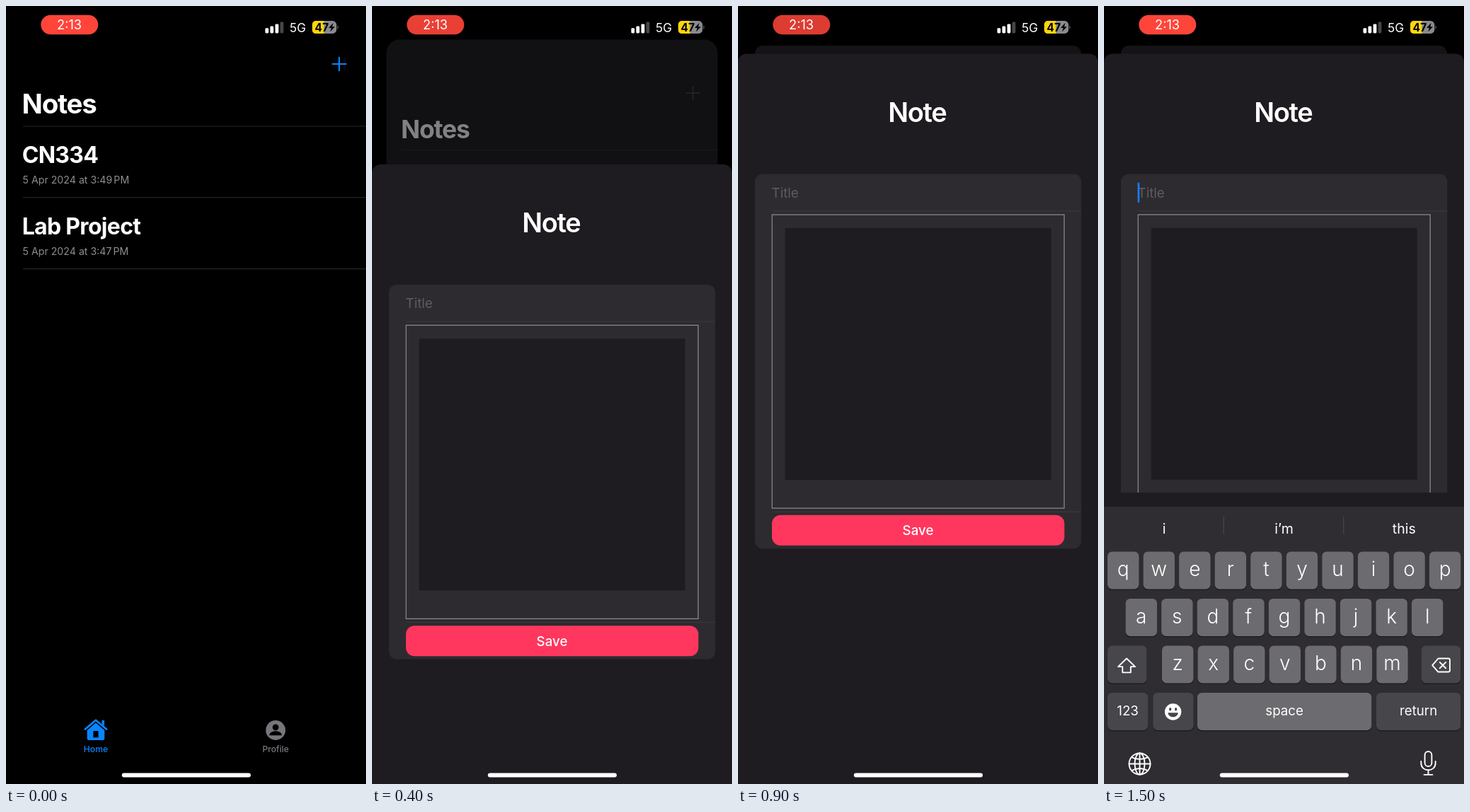
An HTML page for the animation above (1.6 s loop, 509 px wide and 1100 px high).

```html
<!DOCTYPE html>
<html lang="en">
<head>
<meta charset="utf-8">
<title>Notes app</title>
<style>
  html, body { margin: 0; width: 100%; height: 100%; overflow: hidden; background: #000; }
  svg { display: block; width: 100vw; height: 100vh; }
  text { font-family: Inter, sans-serif; font-optical-sizing: none; fill: #fff; }
  .mid { text-anchor: middle; }
  .label { font-size: 18.7px; }
  .date { font-size: 14.2px; fill: #8d8d93; }
  .item { font-size: 32px; font-weight: 700; letter-spacing: -.7px; }
  .tab { font-size: 12.2px; font-weight: 500; text-anchor: middle; }
  .key { font-size: 28px; font-weight: 300; text-anchor: middle; }
  .icon { fill: none; stroke: #fff; stroke-width: 1.9; stroke-linejoin: round; stroke-linecap: round; }
</style>
</head>
<body>
<svg viewBox="0 0 509 1100" preserveAspectRatio="none">
  <rect width="509" height="1100" fill="#000"/>

  <g id="home">
    <rect id="card" width="509" height="1100"/>
    <g id="list">
      <path id="plus" d="M460.8 82h20.6M471.1 71.7v20.6" stroke-width="2.1"/>
      <text x="22.5" y="151.5" font-size="38.5" font-weight="700" letter-spacing="-1.2">Notes</text>
      <path d="M24 170h485M24 270.6h485M24 371.6h485" stroke="#252528" stroke-width="1.2"/>
      <text class="item" x="22.7" y="222">CN334</text>
      <text class="date" x="23.5" y="251">5 Apr 2024 at 3:49<tspan dx="2">PM</tspan></text>
      <text class="item" x="22.7" y="323">Lab Project</text>
      <text class="date" x="23.5" y="352">5 Apr 2024 at 3:47<tspan dx="2">PM</tspan></text>
      <g fill="#0a84ff">
        <path d="M112 1022.5L127 1009.8l15 12.7" fill="none" stroke="#0a84ff" stroke-width="2.8" stroke-linecap="round" stroke-linejoin="round"/>
        <path d="M135.5 1010h3.6v8l-3.6-3z"/>
        <path fill-rule="evenodd" d="M127 1013.5l12.3 10.4v11.3q0 2.8-2.8 2.8h-19q-2.8 0-2.8-2.8v-11.3zM123.4 1025v9.3h7.2v-9.3z"/>
        <text class="tab" x="127" y="1055" style="fill:#0a84ff">Home</text>
      </g>
      <circle cx="381.2" cy="1024" r="13.9" fill="#77767b"/>
      <circle cx="381.2" cy="1019.8" r="4.4"/>
      <path d="M372.4 1031.2c0-8 17.6-8 17.6 0z"/>
      <text class="tab" x="381.2" y="1055" style="fill:#77767b">Profile</text>
    </g>
  </g>

  <g id="sheet">
    <path id="panel" fill="#1e1c20"/>
    <text class="mid" x="253.4" y="96.5" font-size="38" font-weight="600" letter-spacing="-1.3">Note</text>
    <rect x="24" y="170" width="461.3" height="529.7" rx="11" fill="#2d2b2f"/>
    <path d="M48 222.3h437M48 647.6h437" stroke="#39383c" stroke-width="1.2"/>
    <text class="label" x="47.6" y="203.6" style="fill:#5d5c61">Title</text>
    <rect x="48.2" y="227.5" width="413" height="415" fill="none" stroke="#8e8d90" stroke-width="1.2"/>
    <rect x="66.7" y="246.4" width="376" height="356" fill="#1e1c20"/>
    <rect x="48" y="652.3" width="413.5" height="43" rx="12" fill="#ff375f"/>
    <text class="label mid" x="254.5" y="680.7" font-weight="500">Save</text>
    <rect id="caret" x="47.6" y="182" width="2.6" height="28.5" rx="1.3" fill="#1a7dff"/>
  </g>
  <rect id="cover" y="688" width="509" height="412" fill="#1e1c20"/>

  <g id="keyboard">
    <rect width="509" height="420" fill="#2f2d31"/>
    <path d="M169.2 14v24.5M338.8 14v24.5" stroke="#49484c" stroke-width="1.2"/>
    <g class="mid" font-size="19.5">
      <text x="85" y="37.5">i</text>
      <text x="254.5" y="37.5">i’m</text>
      <text x="424.3" y="37.5">this</text>
    </g>
    <g id="keys"></g>
    <path class="icon" d="M32 214.5l12 11.6h-6.2v8.2h-11.6v-8.2H20z"/>
    <path class="icon" d="M472.5 214.5h14.3q2.2 0 2.2 2.2v14.6q0 2.2-2.2 2.2h-14.3l-8.3-9.5zM474.8 219.8l8.4 8.4m0-8.4l-8.4 8.4"/>
    <circle cx="97.6" cy="290" r="11.7" fill="#fff"/>
    <g fill="#47464a">
      <ellipse cx="93.6" cy="286.2" rx="1.6" ry="2.3"/>
      <ellipse cx="101.6" cy="286.2" rx="1.6" ry="2.3"/>
      <path d="M90.4 291.3h14.4c-.8 8-13.6 8-14.4 0z"/>
    </g>
    <g class="icon" stroke-width="1.8">
      <circle cx="50.5" cy="363.5" r="15"/>
      <ellipse cx="50.5" cy="363.5" rx="7" ry="15"/>
      <path d="M50.5 348.5v30M35.5 363.5h30M39 354q11.5 6 23 0M39 373q11.5-6 23 0"/>
      <rect x="453.6" y="346" width="9.8" height="21" rx="4.9"/>
      <path d="M448.3 360v2.5c0 13 20.4 13 20.4 0V360M458.5 372.5v6.3M452.5 378.8h12"/>
    </g>
  </g>

  <rect id="pill" x="49.3" y="12.8" width="81" height="27.4" rx="13.7"/>
  <text class="mid" x="89.6" y="33" font-size="18.2">2:13</text>
  <g fill="#fff">
    <rect x="366.5" y="31.3" width="4.8" height="7.2" rx="1.4"/>
    <rect x="373.5" y="28.6" width="4.8" height="9.9" rx="1.4"/>
    <rect x="380.6" y="25.4" width="4.8" height="13.1" rx="1.4"/>
    <rect x="387.6" y="22.4" width="4.8" height="16.1" rx="1.4" fill="#464649"/>
  </g>
  <text x="401" y="37" font-size="17.3">5G</text>
  <rect x="433" y="21" width="34.3" height="18" rx="5.6" fill="#8a898e"/>
  <path d="M449.3 21v18h-10.7q-5.6 0-5.6-5.6v-6.8q0-5.6 5.6-5.6z" fill="#ffd60a"/>
  <path d="M468.6 27.2q2.2 2.8 0 5.8z" fill="#8a898e"/>
  <text x="436.6" y="35.6" font-size="15.6" font-weight="700" style="fill:#000">47</text>
  <path d="M462.8 23.8l-6.6 7.2h3.8l-1.8 5.6 6.8-7.4h-3.8z"/>
  <rect x="163.8" y="1084.6" width="182.2" height="6" rx="3" fill="#fff"/>
</svg>
<script>
const LOOP = 1600, STEP = 100;
const W = 509, H = 1100;
const SHEET_TOP = 67.5, KEYBOARD_TOP = 688;
const $ = id => document.getElementById(id);
const set = (id, attrs) => {
  for (const name in attrs) $(id).setAttribute(name, attrs[name]);
};
const show = (id, on) => set(id, { visibility: on ? 'visible' : 'hidden' });

// Remaining distance of a critically damped spring, 1 down to 0
const spring = (t, start) => {
  const u = Math.max(0, t - start) * 0.01826;
  return (1 + u) * Math.exp(-u);
};

function buildKeys() {
  const rowY = row => 63.4 + row * 66.5;
  let out = '';
  const key = (x, row, w, label, dark, cls) => {
    const y = rowY(row), base = cls === 'key' ? 35 : 32.5;
    out += `<rect x="${x}" y="${y + 1.4}" width="${w}" height="53" rx="6.5" fill="#1b1a1d"/>` +
      `<rect x="${x}" y="${y}" width="${w}" height="53" rx="6.5" fill="${dark ? '#47464a' : '#6c6b6f'}"/>` +
      `<text class="${cls}" x="${x + w / 2}" y="${y + base}">${label}</text>`;
  };
  [['qwertyuiop', 5], ['asdfghjkl', 30.6], ['zxcvbnm', 82]].forEach(([letters, x], row) => {
    [...letters].forEach((c, i) => key(x + i * 50.55, row, 44.4, c, false, 'key'));
  });
  const wide = 'label mid';
  key(5, 2, 55.4, '', true, wide);
  key(448.8, 2, 55.4, '', true, wide);
  key(5, 3, 57.2, '123', true, wide);
  key(69.3, 3, 57.2, '', true, wide);
  key(132, 3, 246.2, 'space', false, wide);
  key(385, 3, 119.2, 'return', true, wide);
  $('keys').innerHTML = out;
}

function panelPath(bottomR) {
  const h = H - SHEET_TOP, r = 12, b = bottomR;
  return `M0 ${r}A${r} ${r} 0 0 1 ${r} 0H${W - r}A${r} ${r} 0 0 1 ${W} ${r}` +
    `V${h - b}A${b} ${b} 0 0 1 ${W - b} ${h}H${b}A${b} ${b} 0 0 1 0 ${h - b}Z`;
}

function draw(t) {
  const left = spring(t, 216), p = 1 - left;
  const scale = 1 - 0.0943 * p;

  set('home', { transform: `translate(${W / 2 * (1 - scale)} ${56 * p}) scale(${scale})` });
  set('card', { rx: 62 - 50 * p, fill: `rgb(${20 * p},${19 * p},${22 * p})` });
  set('list', { opacity: 1 - 0.62 * p });
  set('plus', {
    stroke: t < 300 ? '#0a84ff' : '#38373b',
    opacity: t >= 100 && t < 300 ? 0.3 : 1
  });

  set('sheet', { transform: `translate(0 ${SHEET_TOP + (H - SHEET_TOP) * left})` });
  set('panel', { d: panelPath(t < 800 ? 62 : 0) });
  show('caret', t >= 1300);
  show('cover', t >= 1500);

  const ky = KEYBOARD_TOP + (H - KEYBOARD_TOP) * spring(t, 1238.4);
  set('keyboard', { transform: `translate(0 ${ky})` });

  const glow = 1 - 0.075 * (1 - Math.cos(2 * Math.PI * t / 1500));
  set('pill', { fill: `rgb(${255 * glow},${69 * glow},${58 * glow})` });
}

buildKeys();
const begin = performance.now();
function tick() {
  const t = (performance.now() - begin + 1) % LOOP;
  draw(Math.floor(t / STEP) * STEP);
  requestAnimationFrame(tick);
}
tick();
</script>
</body>
</html>
```
